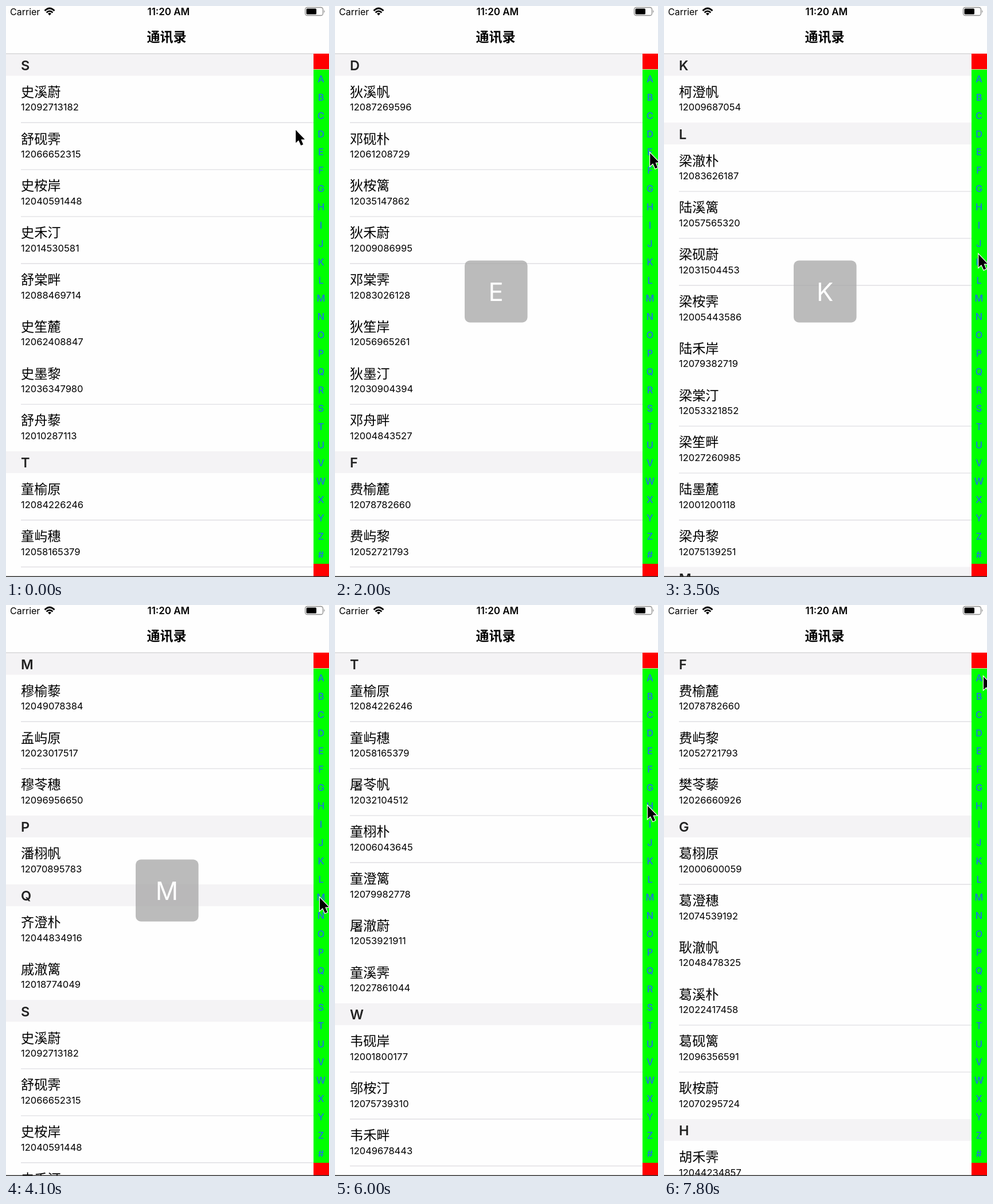
Write an HTML page that moves like this. It is 563x995 px and loops after 8 s.

```html
<!DOCTYPE html>
<html lang="zh-CN">
<head>
<meta charset="utf-8">
<style>
  html, body { margin: 0; width: 100%; height: 100%; overflow: hidden; background: #fefefe; }
  svg { display: block; width: 563px; height: 995px; font-family: Inter, "Noto Sans CJK SC", "Noto Sans CJK", sans-serif; }
  .name { font: 23.2px "Noto Sans CJK SC", "Noto Sans CJK", sans-serif; }
  .phone { font-size: 16.5px; }
  .head { font-size: 23.5px; font-weight: 600; fill: #222; }
  .mid { text-anchor: middle; }
  .title { font: 700 23px "Noto Sans CJK SC", "Noto Sans CJK", sans-serif; }
  .status { font-size: 16px; }
  .clock { font-size: 16.9px; font-weight: 600; }
  #index { font-size: 16.3px; font-weight: 500; fill: #1f70e8; }
</style>
</head>
<body>
<svg viewBox="0 0 563 995">
  <defs>
    <!-- hairlines drop out in the middle of the screen -->
    <clipPath id="bands"><path d="M0 84H563V500H0ZM0 690H563V995H0Z"/></clipPath>
  </defs>
  <rect width="563" height="995" fill="#fefefe"/>
  <g clip-path="url(#bands)"><path id="lines" stroke="#e0dfe3" stroke-width="1.4"/></g>
  <g id="list"></g>

  <rect width="563" height="83" fill="#fefefe"/>
  <path d="M0 83.2H536" stroke="#cfcfd1" stroke-width="1.3"/>
  <text class="status" x="7" y="16">Carrier</text>
  <g fill="none" stroke="#000" stroke-width="2.7">
    <path d="M67.5 8.2Q76 -.2 84.5 8.2M70.6 11.5Q76 6.4 81.4 11.5"/>
    <path d="M73 13.2Q76 10.6 79 13.2L76 16.4Z" fill="#000" stroke="none"/>
  </g>
  <text class="clock mid" x="283.3" y="16">11:20 AM</text>
  <rect x="521.5" y="2.5" width="31" height="14" rx="3.5" fill="none" stroke="#8c8c8c" stroke-width="1.3"/>
  <rect x="523.5" y="4.5" width="17.5" height="10" rx="1.5"/>
  <path d="M554.3 7Q557 9.5 554.3 12Z" fill="#8c8c8c"/>
  <text class="title mid" x="280" y="62">通讯录</text>

  <path d="M536 83H563V995H536Z" fill="#f00"/>
  <path d="M536 111H563V972H536Z" fill="#0f0"/>
  <path d="M536 110.5H563" stroke="#d8dca0"/>
  <g id="index" class="mid"></g>
  <path d="M0 994.3H563" stroke="#333" stroke-width="1.4"/>

  <g id="popup">
    <rect x="226" y="443.5" width="109.5" height="108" rx="9" fill="#aaa" fill-opacity=".8"/>
    <text id="letter" class="mid" x="280.5" y="513.5" font-size="43.5" fill="#fff"></text>
  </g>
  <path id="cursor" d="M0 0V22.5L5 18L9 27L13 25.2L9.3 16.5H15.8Z" stroke="#fff" stroke-width="2.4" paint-order="stroke"/>
</svg>
<script>
const $ = id => document.getElementById(id);
const LETTERS = 'ABCDEFGHIJKLMNOPQRSTUVWXYZ#';
const TOP = 83.5, HEAD = 38, ROW = 81.8, STEP = 31.88, FIRST = 127, FADE = 400;

// letter, surnames, number of rows
const SECTIONS = `A艾安2 B柏卞4 C褚岑5 D狄邓8 F费樊3 G葛耿6 H胡霍8 J金姜1 K柯康1 L梁陆9
  M穆孟3 P潘裴1 Q戚齐2 S史舒8 T童屠7 W韦邬9 X许项6 Y颜尹6 Z邹祝9`.split(/\s+/);
const GIVEN = ['禾墨屿澄砚棠舟苓澈桉笙榆栩溪', '岸朴藜汀篱原畔蔚穗麓霁帆黎'];

const text = (cls, x, y, s) => `<text class="${cls}" x="${x}" y="${y}">${s}</text>`;

// Build the contact list once, remembering where each section starts
const starts = {};
let y = 0, n = 0, list = '', lines = '';
for (const [letter, a, b, count] of SECTIONS) {
  starts[letter] = y;
  list += `<rect y="${y}" width="536" height="${HEAD}" fill="#f4f3f5"/>` + text('head', 26, y + 28.3, letter);
  y += HEAD;
  for (let i = 0; i < count; i++, n++, y += ROW) {
    const name = (n * 7 % 3 ? a : b) + GIVEN[0][n * 5 % 14] + GIVEN[1][(n * 3 + 4) % 13];
    const phone = '120' + String((n + 1) * 73939133 % 1e8).padStart(8, '0');
    list += text('name', 26, y + 36.3, name) + text('phone', 26, y + 61, phone);
    if (i < count - 1) lines += `M26 ${y + ROW}H536`;
  }
}
$('list').innerHTML = list;
$('lines').setAttribute('d', lines);
$('index').innerHTML = [...LETTERS].map((c, i) => text('', 549, FIRST + i * STEP + 5.9, c)).join('');

// Pointer path: time, x, y
const PATH = [
  [0, 505, 216], [500, 540, 147], [1000, 548, 151], [2700, 550, 330], [4100, 547, 510],
  [5400, 546, 735], [5500, 546, 735], [6000, 545, 350], [6500, 546, 350],
  [7100, 555, 283], [7400, 555, 280], [7800, 557, 125]
];
// One long drag, then two taps: pressed, released
const PRESSES = [[1000, 5500], [6400, 6500], [7300, 7400]];

function pointer(t) {
  const k = Math.max(1, PATH.findIndex(p => p[0] >= t));
  const [a, b] = [PATH[k - 1], PATH[k]], f = (t - a[0]) / (b[0] - a[0]);
  return [1, 2].map(i => a[i] + (b[i] - a[i]) * f);
}

const letterAt = t => LETTERS[Math.round((pointer(t)[1] - FIRST) / STEP)];

// Letters without contacts keep the previous section in place
const sectionOf = c => Object.keys(starts).filter(s => s <= c).pop();

function draw(now) {
  // the screen refreshes every 100 ms
  const t = Math.min(7800, Math.floor(now % 8000 / 100) * 100);
  const press = PRESSES.filter(p => p[0] <= t).pop();
  const letter = press ? letterAt(Math.min(t, press[1])) : 'S';
  const alpha = press ? 1 - Math.min(1, Math.max(0, t - press[1]) / FADE) : 0;
  const shift = `translate(0 ${TOP - starts[sectionOf(letter)]})`;
  $('list').setAttribute('transform', shift);
  $('lines').setAttribute('transform', shift);
  $('letter').textContent = letter;
  $('popup').setAttribute('opacity', alpha);
  $('cursor').setAttribute('transform', `translate(${pointer(t)})`);
}

const begin = performance.now();
function tick() {
  draw(performance.now() - begin);
  requestAnimationFrame(tick);
}
tick();
</script>
</body>
</html>
```
